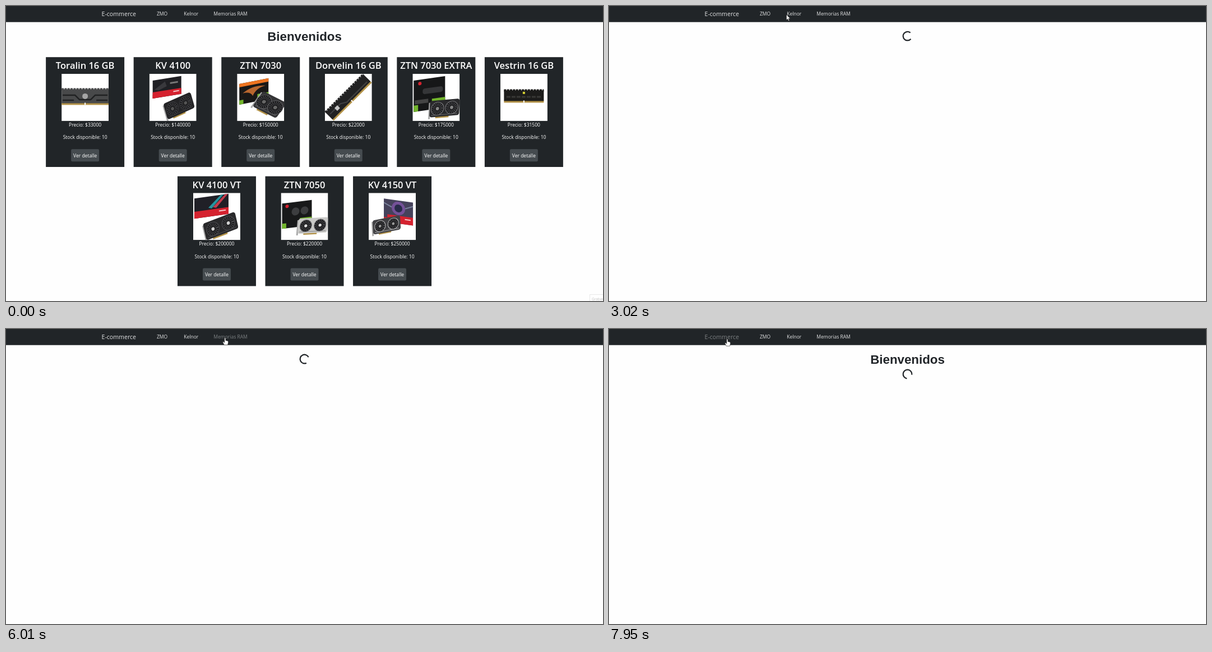
Write an HTML page that moves like this. It is 1065 px wide and 526 px high and loops after 8000 ms.

```html
<!DOCTYPE html>
<html lang="es">
<head>
<meta charset="utf-8">
<title>E-commerce</title>
<style>
  html, body { margin: 0; width: 100%; height: 100%; overflow: hidden; background: #fefefe; }
  svg { display: block; }
  text { font: 8.5px "Open Sans", "Noto Sans", sans-serif; fill: #fff; }
  .mid { text-anchor: middle; }
  .name { font-size: 16.5px; font-weight: 600; }
  .brand { font-size: 10.6px; }
  .hello { font: bold 22.3px "Liberation Sans", Arial, sans-serif; fill: #212529; }
  .tip { font-size: 6.5px; fill: #c4c4c4; }
  .link { fill: #e3e4e5; }
  .link.over { fill: #7d8183; }
</style>
</head>
<body>
<svg id="stage" width="1065" height="526" viewBox="0 0 1065 526"></svg>
<script>
const MID = 532.5, PITCH = 156.55, LOOP = 8000;
const DARK = '#212528', GOLD = '#b39247', GREEN = '#72b52c', RED = '#d5222f';

const rect = (x, y, w, h, fill, extra = '') =>
  `<rect x="${x}" y="${y}" width="${w}" height="${h}" fill="${fill}" ${extra}/>`;
const circle = (x, y, r, fill, extra = '') =>
  `<circle cx="${x}" cy="${y}" r="${r}" fill="${fill}" ${extra}/>`;
const path = (d, fill, extra = '') => `<path d="${d}" fill="${fill}" ${extra}/>`;
const text = (x, y, cls, s) => `<text x="${x}" y="${y}" class="${cls}">${s}</text>`;
const place = (move, body) => `<g transform="${move}">${body}</g>`;

// Retail box seen at a slant; the band covers its lower part from bandX on
function box(x, y, w, h, skew, fill, band, bandX, art) {
  return place(`translate(${x} ${y}) skewY(${skew})`,
    rect(0, 0, w, h, fill) + art +
    rect(w * bandX, h * .66, w * (1 - bandX), h * .34, band) +
    rect(0, h * .8, w * .14, h * .2, band) +
    rect(w * .72, h * .76, w * .2, 2, '#fff', 'opacity=".75"'));
}

// Graphics card with two fans, a bracket and gold contacts
function board(x, y, angle, len, h, fill, rim, hub) {
  const fan = fx => circle(fx, 0, h * .39, '#18181a', `stroke="${rim}"`) +
    circle(fx, 0, h * .25, 'none', `stroke="#515154" stroke-width="${h * .2}" stroke-dasharray="1 1.7"`) +
    circle(fx, 0, h * .1, hub);
  return place(`translate(${x} ${y}) rotate(${angle}) skewX(-8)`,
    rect(-len * .3, h * .4, len * .45, h * .18, GOLD) +
    rect(-len / 2 - 2, -h * .4, 3, h, '#aaa') +
    rect(-len / 2, -h / 2, len, h, fill, 'rx="4"') +
    rect(-len / 2 + 3, h * .36, len - 6, 1.5, rim, 'opacity=".6"') +
    fan(-len * .24) + fan(len * .24));
}

// Memory stick with a toothed heat spreader
function stick(x, y, angle, len, h, fill, detail) {
  return place(`translate(${x} ${y}) rotate(${angle})`,
    rect(-len / 2, h / 2 - 3, len, 4, GOLD) +
    rect(-len / 2, -h / 2, len, h - 2, fill) +
    path(`M${-len / 2} ${-h / 2}H${len / 2}`, 'none', `stroke="${fill}" stroke-width="4" stroke-dasharray="4 1.3"`) +
    rect(-1, h / 2 - 3, 2, 4, '#fff') + detail);
}

const slash = (color, x) => path(`M${x} 20L${x + 22} 0H${x + 27}L${x + 6} 22Z`, color);
const product = (name, price, kind, art) => ({ name, price, kind, art });

const products = [
  product('Toralin 16 GB', 33000, 'memory', stick(42, 41, 0, 84, 27, '#48494a',
    path('M-40 -3H-18L-10 5H10L18 -3H40M-40 6H-20M20 6H40', 'none', 'stroke="#202122" stroke-width="2.5"') +
    circle(0, -1, 5, '#a5a5a5'))),
  product('KV 4100', 140000, 'zmo',
    box(6, 12, 51, 32, -9, '#202024', RED, 0,
      path('M3 17L22 5L25 14L11 19Z', '#39393d') + rect(31, 8, 14, 3, '#777')) +
    board(53, 57, -24, 53, 29, '#242426', '#3d3d40', '#555')),
  product('ZTN 7030', 150000, 'kelnor',
    box(4, 18, 52, 37, -11, '#191817', GREEN, .62,
      rect(0, 0, 52, 6, '#ee7420') + path('M6 18Q24 6 47 12Q30 13 24 26Q20 17 6 18Z', '#b8662e')) +
    board(58, 55, 27, 47, 33, '#343436', '#68686b', '#666')),
  product('Dorvelin 16 GB', 22000, 'memory', stick(42, 42, -45, 96, 20, '#222223',
    path('M-44 -2H-18L-8 4H43', 'none', 'stroke="#424244" stroke-width="2"') +
    rect(-31, -4, 7, 7, '#c5c5c5'))),
  product('ZTN 7030 EXTRA', 175000, 'kelnor',
    box(2, 12, 56, 56, -8, '#161718', GREEN, .58,
      circle(11, 7, 3, RED) + rect(16, 17, 36, 10, '#353638', 'rx="4"') +
      rect(2, 36, 24, 7, '#444')) +
    board(57, 61, -5, 53, 29, '#29292b', '#77777a', '#888')),
  product('Vestrin 16 GB', 31500, 'memory', stick(42, 40, 0, 71, 21, '#1c1c1b',
    path('M-31 1H31', 'none', 'stroke="#383836" stroke-width="3" stroke-dasharray="7 2"') +
    rect(-2, -8, 4, 4, '#d3cf32'))),
  product('KV 4100 VT', 200000, 'zmo',
    box(2, 10, 61, 36, -8, '#202027', RED, 0, slash('#24959f', 25) + slash('#c43b4b', 33)) +
    board(49, 59, -21, 61, 30, '#29292b', '#505055', '#d0d0d0')),
  product('ZTN 7050', 220000, 'kelnor',
    box(2, 19, 53, 45, -7, '#18191a', GREEN, .6,
      circle(9, 6, 3, RED) + circle(24, 17, 7, '#3c3d3f') + circle(40, 17, 7, '#3c3d3f')) +
    board(57, 58, -3, 53, 27, '#c9c9c7', '#77777a', '#ddd')),
  product('KV 4150 VT', 250000, 'zmo',
    box(27, 10, 52, 41, 8, '#45425b', RED, .12,
      circle(26, 14, 12, '#745198') + circle(26, 14, 7, '#282b49') +
      path('M0 7L14 13M52 7L38 13', 'none', 'stroke="#7b849e" stroke-width="2"')) +
    board(32, 57, -11, 50, 25, '#414144', '#b7b7b9', '#999')),
];

function card(p, i, list) {
  const cols = list.length > 3 ? 6 : 3, row = Math.floor(i / cols);
  const inRow = Math.min(cols, list.length - row * cols);
  const x = MID + (i % cols - (inRow - 1) / 2) * PITCH - 70;
  return place(`translate(${x} ${row * 212.4})`,
    rect(0, 0, 140, 195.8, DARK) +
    text(70, 21.3, 'mid name', p.name) +
    `<svg x="28" y="29.7" width="84" height="84">${rect(0, 0, 84, 84, '#fff')}${p.art}</svg>` +
    text(70, 123.5, 'mid', 'Precio: $' + p.price) +
    text(70, 146, 'mid', 'Stock disponible: 10') +
    rect(45, 164, 50, 22, '#454b4f', 'rx="2.3"') +
    text(70, 178.4, 'mid', 'Ver detalle'));
}

const links = [
  ['E-commerce', 170.5, 232, 'brand'],
  ['ZMO', 269, 290, ''],
  ['Kelnor', 317.3, 343, ''],
  ['Memorias RAM', 370.3, 431, ''],
];

// time, view, welcome heading shown
const scenes = [
  [0, 'all', true], [2250, 'all', false], [2320, 'load', false], [3400, 'zmo', false],
  [4520, 'load', false], [4730, 'kelnor', false], [6010, 'load', false], [6290, 'memory', false],
  [7880, 'load', true],
];

// time, x, y of the pointer tip
const route = [
  [0, 1080, 540], [70, 1066, 522], [810, 258, 42], [1100, 224, 20], [1330, 262, 6],
  [1640, 284, 11.5], [1780, 284, 12], [2250, 284, 12], [3020, 316.5, 15.5],
  [3660, 333, 15.5], [4450, 333, 15.5], [4870, 384, 15.5], [5080, 390, 16],
  [5330, 390, 16], [5340, 391, 16], [6010, 391, 16], [6430, 349.5, 27],
  [6710, 275.5, 28], [7130, 211, 18], [LOOP, 211, 18],
];
const clicks = [2180, 4450, 5940, 7810];

const views = ['all', 'zmo', 'kelnor', 'memory'];
const listFor = v => products.filter(p => v === 'all' || p.kind === v);
const outline = 'stroke="#222" stroke-width=".6" stroke-linejoin="round"';

document.getElementById('stage').innerHTML =
  rect(0, 0, 1065, 526, '#fefefe') + rect(0, 0, 1065, 28.7, DARK) +
  links.map(([s, x, , cls]) => text(x, cls ? 17.9 : 16.9, 'link ' + cls, s)).join('') +
  `<g id="hello">${text(MID, 61.5, 'mid hello', 'Bienvenidos')}</g>` +
  `<g id="cards">${views.map(v => `<g id="${v}">${listFor(v).map(card).join('')}</g>`).join('')}</g>` +
  `<g id="load">${circle(0, 0, 7.85, 'none',
    'stroke="#212529" stroke-width="2.24" pathLength="4" stroke-dasharray="3 1"')}</g>` +
  `<g id="tip">${rect(1041.5, 514.5, 30, 20, '#fff', 'stroke="#e8e8e8"')}${text(1045, 525, 'tip', 'Grabar')}</g>` +
  `<g id="pointer">${circle(0, -.3, 6.7, '#c6bb12', 'id="pulse" opacity=".9"')}` +
  path('M0 0V9.6L2.2 7.6L3.7 10.9L5.2 10.2L3.8 7H6.8Z', '#fff', 'id="arrow" ' + outline) +
  path('M-1.1 .8C-1.1 -.4 1 -.4 1 .8V4.4L4.6 5.3Q5.9 5.8 5.6 7.8L4.6 12.4H-1.6L-4 8C-4.4 6.9 -3.2 6.3 -2.4 7L-1.1 8.2Z',
    '#fff', 'id="hand" ' + outline) + '</g>';

const el = id => document.getElementById(id);
const show = (id, on) => { el(id).style.display = on ? '' : 'none'; };
const move = (id, value) => el(id).setAttribute('transform', value);
const linkEls = document.querySelectorAll('.link');

function pointerAt(t) {
  const i = route.findIndex(k => k[0] > t);
  const [t0, x0, y0] = route[i - 1], [t1, x1, y1] = route[i];
  const k = (t - t0) / (t1 - t0);
  return [x0 + (x1 - x0) * k, y0 + (y1 - y0) * k];
}

function draw(t) {
  const [since, view, hello] = scenes.findLast(s => s[0] <= t);
  show('hello', hello);
  for (const v of [...views, 'load']) show(v, v === view);
  move('cards', `translate(0 ${hello ? 91.2 : 64.3})`);
  const angle = 45 + (t - since + 40) / 750 * 360;
  move('load', `translate(${MID} ${hello ? 80.5 : 53.6}) rotate(${angle})`);

  const [x, y] = pointerAt(t);
  let hovering = false;
  links.forEach(([, left, right], i) => {
    const over = x >= left && x <= right && y > 5 && y < 24;
    linkEls[i].classList.toggle('over', over);
    hovering ||= over;
  });
  move('pointer', `translate(${x} ${y})`);
  show('hand', hovering);
  show('arrow', !hovering);
  show('pulse', clicks.some(c => t >= c && t < c + 70));
  show('tip', t < 140);
}

const start = performance.now();
function tick() {
  draw((performance.now() - start) % LOOP);
  requestAnimationFrame(tick);
}
tick();
</script>
</body>
</html>
```
